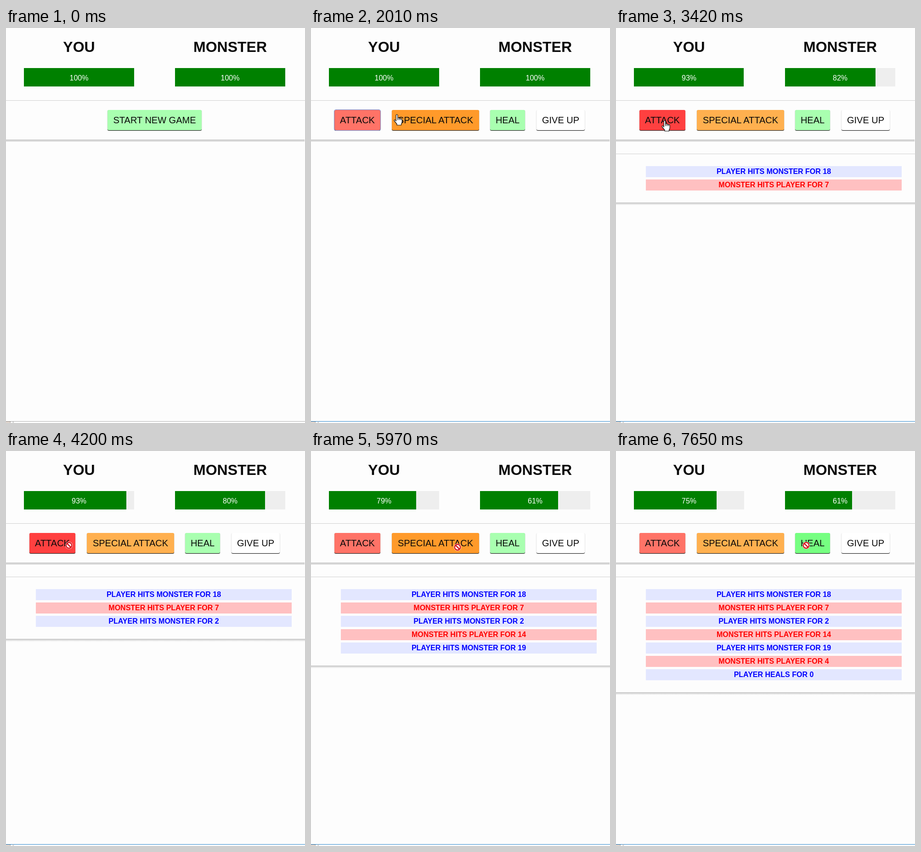
An HTML page that plays this animation: 651 by 858 pixels, repeating every 8 s.

```html
<!DOCTYPE html>
<html lang="en">
<head>
<meta charset="utf-8">
<title>Monster duel</title>
<style>
  html, body { margin: 0; width: 100%; height: 100%; overflow: hidden; background: #fdfdfd; }
  #stage {
    position: relative; width: 651px; height: 858px; overflow: hidden;
    background: #fdfdfd; color: #0a0a0a;
    font-family: "Liberation Sans", Arial, sans-serif; text-align: center;
  }
  #stage div, #stage svg, h1 { position: absolute; white-space: nowrap; }
  h1 { margin: 0; top: 23px; width: 240px; font: bold 32px/36px "Liberation Sans", Arial, sans-serif; }
  .bar { top: 87px; width: 240px; height: 40px; background: #eee; }
  .fill { height: 40px; background: #008000; }
  .hp { width: 240px; color: #fff; font-size: 16px; line-height: 43px; }
  .you { left: 39px; }
  .monster { left: 368px; }
  .line { left: 0; width: 651px; height: 1px; background: #cfcfcf; }
  #band { left: 0; top: 242px; width: 650px; height: 4px; background: #d3d3d3; box-shadow: 0 1px 1px #e6e6e6; }
  .btn {
    top: 178px; height: 44px; border-radius: 3px; box-shadow: 0 1px 1px #000;
    font-size: 20px; line-height: 44px;
  }
  .focus { outline: 1px solid #6f93dc; }
  #log { left: 0; top: 273px; width: 651px; border-top: 1px solid #cfcfcf; box-sizing: border-box; }
  #log::after {
    content: ""; position: absolute; left: 0; top: 100%; width: 100%; height: 6px;
    background: linear-gradient(#c2c2c2, #fdfdfd);
  }
  .row {
    left: 65px; width: 557px; height: 24px; background: #e3e7ff; color: #00f;
    font-weight: bold; font-size: 16px; line-height: 23px;
  }
  .row.hurt { background: #ffc0c1; color: #f00; }
  #edge { top: 854px; }
  #below { left: 0; top: 855px; width: 651px; height: 3px; background: #fff; }
  #chip { left: 0; top: 855px; width: 9px; height: 2px; background: #c9b9ae; border-right: 1px solid #8d8680; }
  #tick { left: 15px; top: 854px; width: 1px; height: 4px; background: #999; }
  #cursor { left: 0; top: 0; overflow: visible; }
  [hidden] { display: none; }
</style>
</head>
<body>
<div id="stage">
  <h1 class="you">YOU</h1>
  <h1 class="monster">MONSTER</h1>
  <div class="bar you"><div class="fill"></div><div class="hp"></div></div>
  <div class="bar monster"><div class="fill"></div><div class="hp"></div></div>
  <div class="line" style="top:157px"></div>
  <div id="band"></div>
  <div id="log"></div>
  <div id="below"></div>
  <div id="chip"></div>
  <div class="line" id="edge"></div>
  <div id="tick"></div>
  <svg id="cursor" width="1" height="1">
    <g id="arrow" fill="#fff" stroke="#000" stroke-linejoin="round">
      <path d="M.5 .5V16.5L4.2 13 6.6 18.5 9 17.5 6.6 12H11.7Z"/>
    </g>
    <g id="hand" fill="#fff" stroke="#111" stroke-width="1.2" stroke-linejoin="round">
      <path d="M-1.8 14V1.8Q-1.8 0 0 0T1.8 1.8V8Q2 6.8 3.6 6.8 5.2 6.8 5.2 8.6 5.6 7.6 7 7.6 8.4 7.8 8.4 9.6 9 8.8 10 9 11.2 9.4 11.2 11V16Q11 18.5 9.5 20.5V23H0V20.5L-5.5 14Q-6.6 12.2-5.4 11.4-4 10.8-1.8 14Z"/>
      <path fill="none" d="M1.8 8V12M5.2 9V12M8.4 10V12"/>
    </g>
    <g id="barred">
      <circle r="8" fill="#fff"/>
      <circle r="6.2" fill="#fff" stroke="#d4141c" stroke-width="2.4"/>
      <path d="M-4.4-4.4L4.4 4.4" stroke="#d4141c" stroke-width="2.6"/>
    </g>
  </svg>
</div>
<script>
const LOOP = 8000, GAME_ON = 1130, FADE = 500;
const $ = s => document.querySelector(s);

// label, left, width, idle colour, hover colour
const buttons = [
  ['START NEW GAME', 221, 205, '#a9ffb0', '#76ff81'],
  ['ATTACK', 51, 100, '#ff7367', '#ff4040'],
  ['SPECIAL ATTACK', 176, 190, '#ffb04f', '#ff9a2a'],
  ['HEAL', 390, 76, '#a9ffb0', '#76ff81'],
  ['GIVE UP', 491, 105, '#fff', '#f4f4f4']
].map(([label, x, w, idle, hover]) => {
  const el = add($('#stage'), 'btn', label);
  el.style.left = x + 'px';
  el.style.width = w + 'px';
  return { el, x, w, idle, hover };
});
$('#stage').append($('#cursor'));

// lag: how far the bar has already eased when the turn shows up
const turns = [
  { at: 2450, lag: 0, who: 'monster', hp: 82, text: 'PLAYER HITS MONSTER FOR 18' },
  { at: 3420, lag: 30, who: 'you', hp: 93, text: 'MONSTER HITS PLAYER FOR 7' },
  { at: 4200, lag: 65, who: 'monster', hp: 80, text: 'PLAYER HITS MONSTER FOR 2' },
  { at: 5160, lag: 65, who: 'you', hp: 79, text: 'MONSTER HITS PLAYER FOR 14' },
  { at: 5890, lag: 62, who: 'monster', hp: 61, text: 'PLAYER HITS MONSTER FOR 19' },
  { at: 6770, lag: 30, who: 'you', hp: 75, text: 'MONSTER HITS PLAYER FOR 4' },
  { at: 7650, lag: 0, who: 'you', hp: 75, text: 'PLAYER HEALS FOR 0' }
];
turns.forEach((turn, i) => {
  turn.row = add($('#log'), i % 2 ? 'row hurt' : 'row', turn.text);
  turn.row.style.top = 26 + 29 * i + 'px';
});

// button index, from, to
const focus = [[1, 1130, 2450], [1, 4030, 4200], [2, 5810, 5890], [3, 7590, 7650]];

// time, x, y
const path = [
  [60, 556, 838], [130, 497, 688], [190, 455, 612], [250, 450, 607],
  [430, 450, 607], [560, 442, 485], [650, 400, 340], [740, 362, 235], [830, 339, 191],
  [1290, 338, 191], [1490, 319, 188], [1700, 270, 172], [1850, 205, 150],
  [2000, 188, 185], [2090, 180, 211], [2160, 163, 211], [2310, 106, 201],
  [3420, 106, 201], [3810, 137, 205], [4200, 137, 205], [4700, 320, 218],
  [5160, 320, 218], [5700, 319, 209], [6770, 319, 209], [7280, 414, 205]
];

function add(parent, cls, text) {
  const el = document.createElement('div');
  el.className = cls;
  el.textContent = text;
  parent.append(el);
  return el;
}

// cubic-bezier(.25, .1, .25, 1)
function ease(x) {
  if (x >= 1) return 1;
  let lo = 0, hi = 1;
  for (let i = 0; i < 20; i++) {
    const u = (lo + hi) / 2;
    if (.75 * u * (1 - u) + u ** 3 < x) lo = u; else hi = u;
  }
  return .3 * lo * (1 - lo) ** 2 + 3 * lo * lo * (1 - lo) + lo ** 3;
}

function pointer(t) {
  const i = path.findIndex(p => p[0] > t);
  if (i < 1) return path[i ? path.length - 1 : 0].slice(1);
  const [t0, x0, y0] = path[i - 1], [t1, x1, y1] = path[i];
  const k = (t - t0) / (t1 - t0);
  return [x0 + (x1 - x0) * k, y0 + (y1 - y0) * k].map(Math.round);
}

function drawBar(who, t) {
  let hp = 100, width = 100;
  for (const turn of turns) {
    if (turn.who !== who || t < turn.at) continue;
    width = hp + (turn.hp - hp) * ease((t - turn.at + turn.lag) / FADE);
    hp = turn.hp;
  }
  $(`.${who} .fill`).style.width = width + '%';
  $(`.${who} .hp`).textContent = hp + '%';
}

function draw(t) {
  const playing = t >= GAME_ON;
  drawBar('you', t);
  drawBar('monster', t);

  const shown = turns.filter(turn => t >= turn.at).length;
  turns.forEach((turn, i) => turn.row.hidden = i >= shown);
  $('#log').hidden = !shown;
  $('#log').style.height = 48 + 29 * shown + 'px';
  $('#edge').style.background = playing ? '#2b86cc' : '#adadad';

  const [x, y] = pointer(t);
  let over = false;
  buttons.forEach((b, i) => {
    const visible = playing === i > 0;
    const hit = visible && t >= 60 && x >= b.x && x <= b.x + b.w && y >= 178 && y <= 222;
    over = over || hit;
    b.el.hidden = !visible;
    b.el.style.background = hit ? b.hover : b.idle;
    b.el.classList.toggle('focus', focus.some(([n, from, to]) => n === i && t >= from && t < to));
  });

  // buttons are locked until the monster has answered
  const kind = !over ? 'arrow' : shown % 2 ? 'barred' : 'hand';
  for (const id of ['arrow', 'hand', 'barred'])
    $('#' + id).style.display = id === kind ? '' : 'none';
  $('#cursor').style.display = t < 60 ? 'none' : '';
  $('#cursor').style.transform = `translate(${x}px, ${y}px)`;
}

const start = performance.now();
function tick() {
  draw((performance.now() - start) % LOOP);
  requestAnimationFrame(tick);
}
tick();
</script>
</body>
</html>
```
